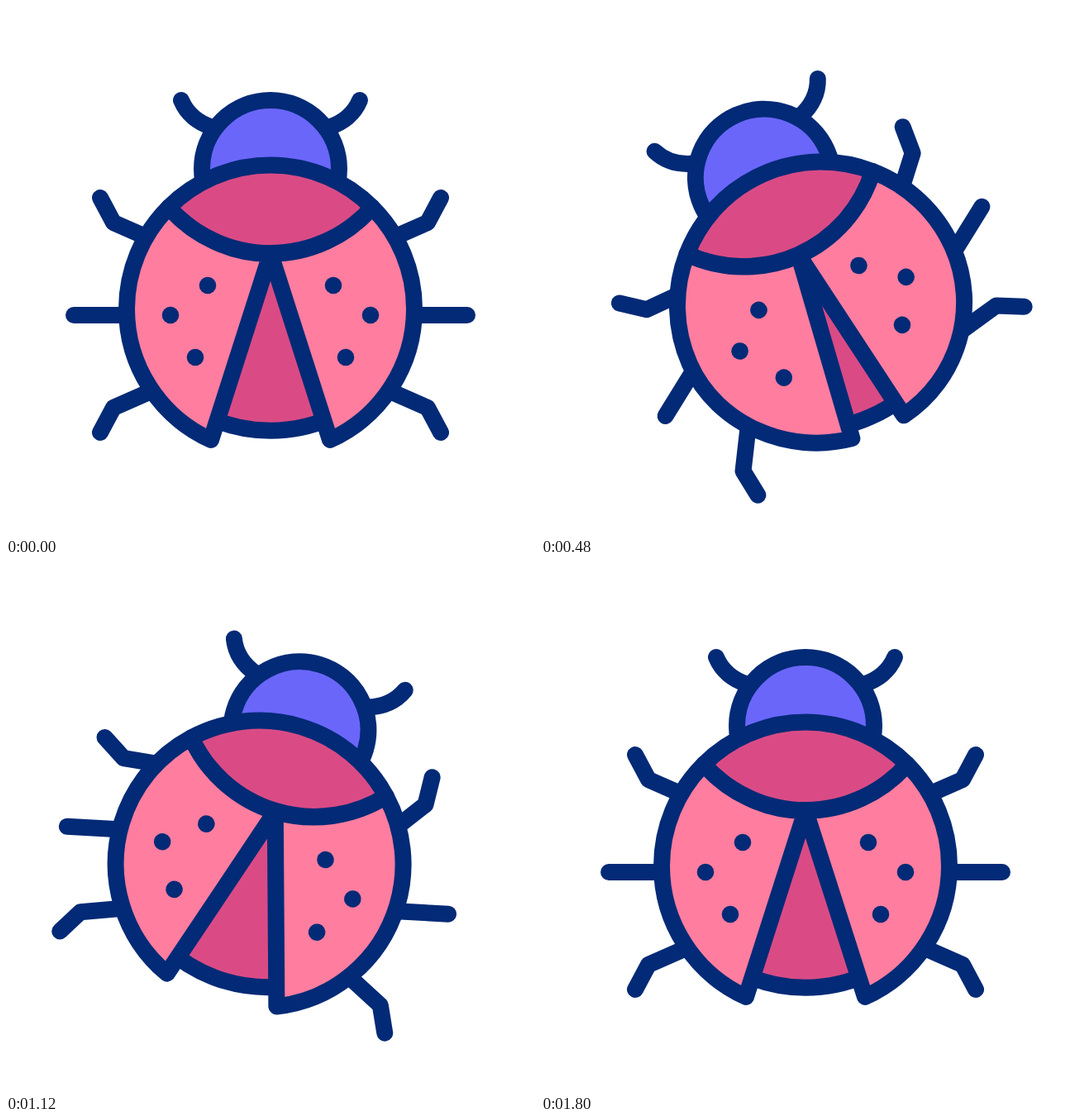
These frames come from a looping animation (640x640 px, 2 s). An HTML page:

```html
<!DOCTYPE html>
<html lang="en">
<head>
<meta charset="utf-8">
<title>Ladybug</title>
<style>
html, body { margin: 0; height: 100%; overflow: hidden; background: #fff; }
svg { display: block; width: 100vw; height: 100vh; }
#bug { fill: none; stroke: #032a76; stroke-width: 20; stroke-linecap: round; stroke-linejoin: round; }
#bug .head { fill: #6a66fa; }
#bug .dark { fill: #da4b85; }
#bug .wing { fill: #ff7d9f; }
#bug .dot { fill: #032a76; stroke: none; }
</style>
</head>
<body>
<svg viewBox="0 0 640 640"><g id="bug"></g></svg>
<script>
const bug = document.getElementById('bug');
const MID = 374;

function add(parent, tag, attrs) {
  const el = document.createElementNS('http://www.w3.org/2000/svg', tag);
  for (const k in attrs) el.setAttribute(k, attrs[k]);
  return parent.appendChild(el);
}

// Left half as drawn, right half mirrored
const addSides = () => ['', 'translate(640 0) scale(-1 1)'].map(transform => add(bug, 'g', { transform }));

const mix = (a, b, w) => a + (b - a) * w;

// Smooth travel through values reached at the given times
function ease(times, values, t) {
  let i = 1;
  while (i < times.length - 1 && t > times[i]) i++;
  const x = Math.min(1, (t - times[i - 1]) / (times[i] - times[i - 1]));
  return mix(values[i - 1], values[i], x * x * (3 - 2 * x));
}

const bodyTurn = t => ease([0, 533, 1067, 1680], [0, -24.7, 17.1, 0], t);
const wingOpen = t => ease([0, 320, 660, 900, 1150, 1480, 1800], [1, 0, 1, 0, 1, 0, 1], t);

// Each pair of legs swings a little later than the pair in front
const legSwing = (t, pair) => ease(
  [0, 395 + 56 * pair, 745 + 28 * pair, 1190 + 125 * pair, 1700 + 50 * pair],
  [0, -36, 40, -36, 0], t);

const legs = [];
addSides().forEach((g, side) => {
  for (let pair = 0; pair < 3; pair++) {
    const s = pair - 1;
    const [x, y] = s ? [180, MID + 90 * s] : [149, MID];
    const d = s ? `M114 ${MID + 142 * s}L130 ${MID + 112 * s}L${x} ${y}` : `M82 ${y}H${x}`;
    legs.push({ el: add(g, 'path', { d }), x, y, pair, dir: side ? -1 : 1 });
  }
  add(g, 'path', { d: 'M212 114Q222 138 250 147' });
});

add(bug, 'circle', { cx: 320, cy: 197, r: 83, class: 'head' });
add(bug, 'path', { d: 'M320 302L240 495A180 180 0 0 0 400 495Z', class: 'dark' });

// tip: where the shut wing ends; push and lean: how far its dots slide inwards
const shape = [{ tip: 323, push: 9, lean: .2 }, { tip: 312, push: 27, lean: -.08 }];
const wings = addSides().map((g, side) => ({
  ...shape[side],
  el: add(g, 'path', { class: 'wing' }),
  dots: [[244, 338], [199, 374], [229, 425]].map(([x, y]) =>
    ({ x, y, el: add(g, 'circle', { r: 10.3, class: 'dot' }) }))
}));

add(bug, 'path', { d: 'M197 243.5A174 174 0 0 1 443 243.5A164 164 0 0 1 197 243.5Z', class: 'dark' });

function drawWing({ el, dots, tip, push, lean }, open) {
  const x = mix(tip, 248, open), y = mix(531.5, 525, open);
  const bend = `146 ${mix(458, 435, open)} ${mix(tip - 91, 186, open)} ${mix(531.5, 497, open)}`;
  el.setAttribute('d', `M197 243.5A174 174 0 0 0 146 366.5C${bend} ${x} ${y}L320 300A164 164 0 0 1 197 243.5Z`);
  for (const dot of dots) {
    const slide = push + lean * (dot.y - 338);
    dot.el.setAttribute('cx', dot.x + slide * (1 - open));
    dot.el.setAttribute('cy', dot.y + 5 * (1 - open));
  }
}

function draw(t) {
  bug.setAttribute('transform', `rotate(${bodyTurn(t)} 320 320)`);
  for (const { el, x, y, pair, dir } of legs) {
    el.setAttribute('transform', `rotate(${dir * legSwing(t, pair)} ${x} ${y})`);
  }
  for (const wing of wings) drawWing(wing, wingOpen(t));
}

// 25 poses per second, then a rest until the loop ends
const start = performance.now();
function tick() {
  const t = (performance.now() - start) % 2000;
  draw(Math.min(1800, Math.floor(t / 40) * 40));
  requestAnimationFrame(tick);
}
tick();
</script>
</body>
</html>
```
